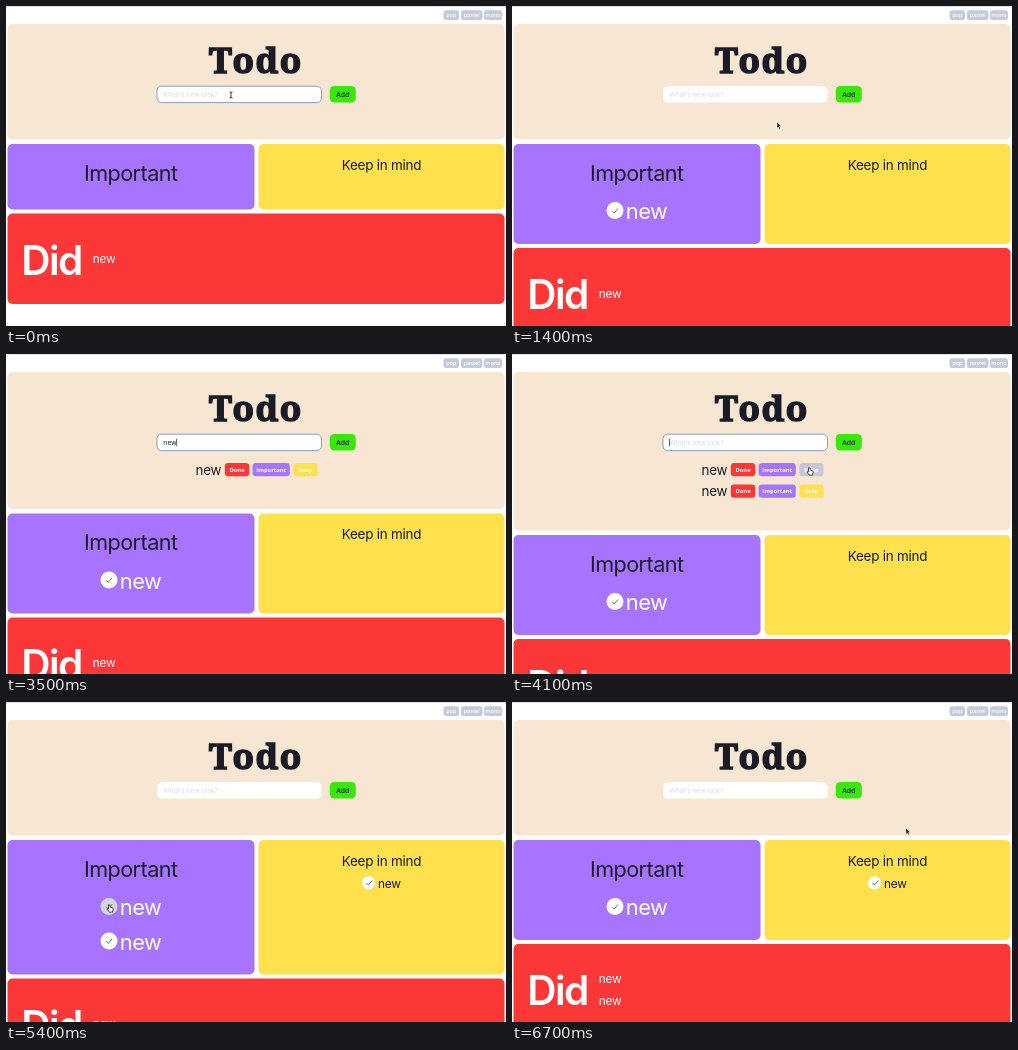
Recreate the animation shown at these times as an HTML page. Size 500 by 320 pixels, loop 7.1 s.

```html
<!DOCTYPE html>
<html lang="en">
<head>
<meta charset="utf-8">
<title>Todo</title>
<style>
html, body { margin: 0; width: 100%; height: 100%; overflow: hidden; background: #fff; }
svg { display: block; width: 100vw; height: 100vh; }
text { font-family: Inter, sans-serif; dominant-baseline: alphabetic; }
.ui { font-family: "Open Sans", "Noto Sans", sans-serif; }
.title { font-family: "Noto Serif", serif; }
</style>
</head>
<body>
<svg id="stage" viewBox="0 0 500 320"></svg>
<script>
const LOOP = 7100, STEP = 100;
const stage = document.getElementById('stage');
const C = {
  ink: '#191b26', cream: '#f7e6d2', purple: '#a674ff', yellow: '#ffe04d',
  red: '#fb3737', green: '#38e807', grey: '#c3cad9', white: '#fff'
};

// Event times
const ADDED = [600, 2700, 3700];
const TO_IMPORTANT = [1300, 5000];
const TO_KEEP = [4200];
const TO_DID = [5500];
const KEYS = [200, 300, 400, 2200, 2300, 2400, 3200, 3300, 3400];
const ROW = 21.5, ITEM = 34.5;

// Pointer stops: time, x, y
const PATH = [
  [0, 225, 89], [900, 225, 89], [1200, 265, 117], [1700, 265, 117],
  [1900, 238, 58], [2100, 225, 88], [3700, 225, 88], [4000, 298, 117],
  [4300, 298, 117], [4500, 271, 118], [5000, 271, 118], [5300, 104, 206],
  [5900, 104, 206], [6300, 339, 106], [6400, 339, 106], [6700, 394, 127]
];

const count = (times, t) => times.filter(e => e <= t).length;

function pointerAt(t) {
  const i = PATH.findIndex(p => p[0] > t);
  if (i < 0) return PATH[PATH.length - 1].slice(1);
  const [t0, x0, y0] = PATH[i - 1], [t1, x1, y1] = PATH[i];
  const k = (t - t0) / (t1 - t0), e = k * k * (3 - 2 * k);
  return [x0 + (x1 - x0) * e, y0 + (y1 - y0) * e];
}

const box = (x, y, w, h, r, fill, extra = '') =>
  `<rect x="${x}" y="${y}" width="${w}" height="${h}" rx="${r}" fill="${fill}" ${extra}/>`;

const text = (x, y, size, str, fill = C.ink, extra = '') =>
  `<text x="${x}" y="${y}" font-size="${size}" fill="${fill}" ${extra}>${str}</text>`;

const label = (x, y, size, str, fill, weight) =>
  text(x, y, size, str, fill, `class="ui" text-anchor="middle" font-weight="${weight}"`);

function check(x, y, r, hot) {
  const s = r / 8.5;
  return `<circle cx="${x}" cy="${y}" r="${r}" fill="${hot ? '#d3d5dc' : C.white}"/>
    <path d="M${x - 2.8 * s} ${y + .2 * s}l2 2.2 3.8-4.6" fill="none" stroke="#444" stroke-width=".8"/>`;
}

function cursor(kind, x, y) {
  const shapes = {
    beam: '<path d="M-1.5-3Q0-3 0-2Q0-3 1.5-3M0-2V2M-1.5 3Q0 3 0 2Q0 3 1.5 3" fill="none" stroke="#222" stroke-width=".9"/>',
    hand: '<path d="M-1.6-3.2q.9-.9 1.4.2l.5 2.2 2 .5q1 .3.8 1.5l-.6 2.9h-3.2l-2.2-3q-.1-1 1.6-.2z" fill="#fff" stroke="#222" stroke-width=".8"/>',
    arrow: '<path d="M0-1V5.2L1.4 3.9 2.4 6.1 3.4 5.6 2.4 3.5H4.2z" fill="#111" stroke="#fff" stroke-width=".4"/>'
  };
  return `<g transform="translate(${x} ${y})">${shapes[kind]}</g>`;
}

function render(t) {
  const toImportant = count(TO_IMPORTANT, t), keep = count(TO_KEEP, t), done = count(TO_DID, t);
  const added = count(ADDED, t);
  const rows = added - toImportant - keep, important = toImportant - done;
  const lastAdd = added ? ADDED[added - 1] : 0;
  const typed = 'new'.slice(0, KEYS.filter(k => k > lastAdd && k <= t).length);
  const focus = t < 1300 || (t >= 2100 && t < 4200);
  const hidden = (t >= 200 && t < 900) || (t >= 2200 && t < 3700);
  const [mx, my] = pointerAt(t);
  let kind = 'arrow';
  const over = (x, y, w, h) => {
    const hit = !hidden && mx >= x && mx <= x + w && my >= y && my <= y + h;
    if (hit) kind = 'hand';
    return hit;
  };

  // Header
  let out = box(0, 0, 500, 320, 0, C.white) + box(0, 0, 500, 1, 0, '#e3e4e8');
  for (const [x, w, str] of [[437.5, 15.5, 'pop'], [455, 21.5, 'pastel'], [478, 18, 'mono']])
    out += box(x, 4.3, w, 9.7, 2.5, C.grey) + label(x + w / 2, 11, 5.5, str, C.white, 600);

  // Todo panel
  out += box(1.5, 18, 497, 115.5 + rows * ROW, 5, C.cream);
  out += text(250, 67, 35, 'Todo', C.ink,
    `class="title" text-anchor="middle" font-weight="900" letter-spacing="1.6" stroke="${C.ink}" stroke-width="1.5"`);
  out += box(151, 80.2, 164.5, 16.4, 4.5, C.white, focus ? 'stroke="#8d9fc0" stroke-width="1"' : '');
  out += typed
    ? text(157.3, 90.6, 6.8, typed, C.ink, 'class="ui" id="entry"')
    : text(157.3, 90.6, 6.8, "What's new task?", '#d5d9e2', 'class="ui"');
  if (focus && t > 0) out += '<path id="caret" d="M0 84.7V92.3" stroke="#222" stroke-width=".7"/>';
  out += box(323.8, 80, 26, 16.5, 4.5, C.green) + label(336.8, 90.6, 6.8, 'Add', C.ink, 600);
  for (let i = 0; i < rows; i++) {
    const y = 109 + i * ROW;
    out += text(189.6, y + 11.8, 13.4, 'new', C.ink, 'letter-spacing="-.25"');
    for (const [x, w, str, fill] of [[218.8, 24.4, 'Done', C.red], [246.6, 37.2, 'Important', C.purple], [287.3, 24.2, 'Keep', C.yellow]])
      out += box(x, y, w, 13.2, 3.2, over(x, y, w, 13.2) ? '#c9c6dc' : fill) +
        label(x + w / 2, y + 8.7, 5.8, str, C.white, 700);
  }

  // Important and Keep panels
  const top = 138 + rows * ROW, height = 65.5 + important * ITEM;
  out += box(1.5, top, 247, height, 5, C.purple) + box(252.5, top, 246, height, 5, C.yellow);
  out += text(124.7, top + 36.5, 21.6, 'Important', C.ink, 'text-anchor="middle" letter-spacing="-.55"');
  for (let i = 0; i < important; i++) {
    const y = top + 66.6 + i * ITEM;
    out += check(103, y, 8.5, over(94.5, y - 8.5, 17, 17)) +
      text(113.8, y + 8.6, 21.8, 'new', C.white, 'letter-spacing="-.5"');
  }
  out += text(375.5, top + 25.8, 13.4, 'Keep in mind', C.ink, 'text-anchor="middle" letter-spacing="-.2"');
  if (keep) {
    const y = top + 42.8;
    out += check(362.6, y, 6.6, over(356, y - 6.6, 13.2, 13.2)) +
      text(372, y + 4.8, 11.8, 'new', C.ink, 'letter-spacing="-.2"');
  }

  // Did panel
  const did = top + height + 4, mid = did + 45.5;
  out += box(1.5, did, 497, 90.5, 5, C.red);
  out += text(15.3, mid + 15.5, 40.5, 'Did', C.white, 'font-weight="600" letter-spacing="-1.6"');
  for (let i = 0; i <= done; i++)
    out += text(86.8, mid + 4.3 + (i - done / 2) * ROW, 11.8, 'new', C.white, 'letter-spacing="-.2"');

  over(323.8, 80, 26, 16.5);
  if (mx > 151 && mx < 315 && my > 80 && my < 97) kind = 'beam';
  if (!hidden) out += cursor(kind, mx, my);
  stage.innerHTML = out;

  const caret = document.getElementById('caret');
  if (caret) {
    const entry = document.getElementById('entry');
    const x = 157.5 + (entry ? entry.getComputedTextLength() : 0);
    caret.setAttribute('transform', `translate(${x} 0)`);
  }
}

let shown = -1;
const start = performance.now();
function tick() {
  const t = Math.floor((performance.now() - start) % LOOP / STEP) * STEP;
  if (t !== shown) render(shown = t);
  requestAnimationFrame(tick);
}
tick();
</script>
</body>
</html>
```
